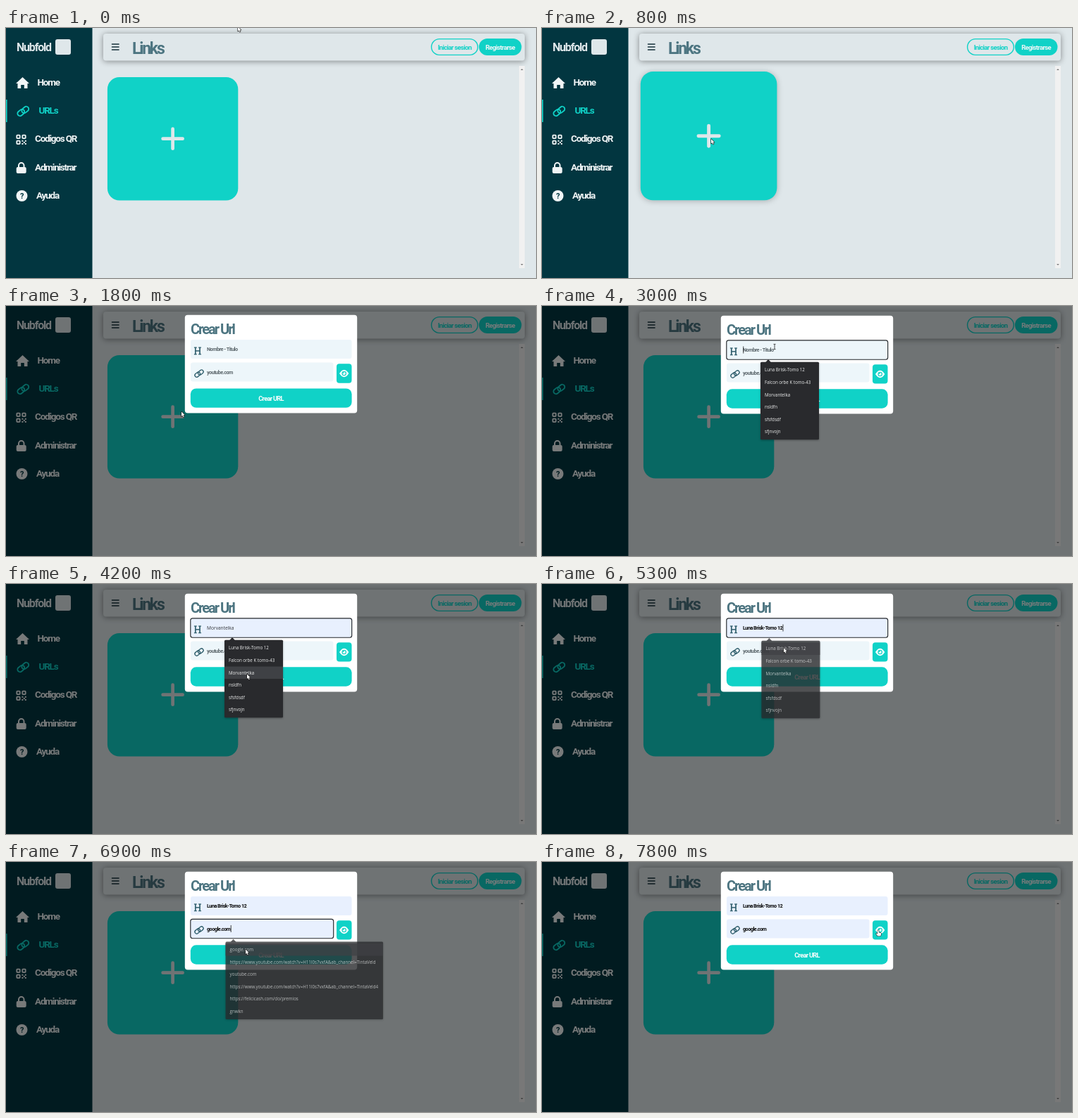
These frames come from a looping animation (752x356 px, 8000 ms). An HTML page with a canvas:

```html
<!DOCTYPE html>
<html lang="es">
<head>
<meta charset="utf-8">
<title>Links</title>
<style>
html, body { margin: 0; width: 100%; height: 100%; overflow: hidden; background: #dfe7ea; }
canvas { display: block; }
</style>
</head>
<body>
<canvas id="stage" width="752" height="356"></canvas>
<script>
const ctx = document.getElementById('stage').getContext('2d');
const LOOP = 8000;
const TEAL = '#10d2c7', PALE = '#dfe7ea', NAVY = '#023640', SLATE = '#4d7581', DEEP = '#315f6d';
const UI = 'Roboto, "Liberation Sans", sans-serif';
const MENU = '"Open Sans", "Noto Sans", sans-serif';

// Times of the user's actions
const OPEN = 1320, FOCUS1 = 2500, LIST1 = 2600, PICK1 = 5250, FOCUS2 = 5700, PICK2 = 6845, BLUR = 7800;
const ROW = 17.6;

const titles = ['Luna Brisk-Tomo 12', 'Falcon orbe K tomo-43', 'Morvantelka', 'nsldfn', 'sfsfdsdf', 'sfjnvojn'];
const watch = 'https://www.youtube.com/watch?v=H11l0s7vxfA&ab_channel=TintaVeld';
const urls = ['google.com', watch, 'youtube.com', watch + '4', 'https://felicicash.com/do/premios', 'gnwkn'];

const path = [
  [0, 329, -2], [100, 329, -2], [450, 302, 70], [800, 240, 158], [1450, 240, 158],
  [1800, 249, 150.5], [2100, 330, 58], [3400, 330, 58], [4000, 341, 139], [4200, 342, 128.5],
  [4550, 343, 91], [5300, 343, 91], [5500, 338, 91], [6000, 338, 91], [6500, 340, 124.5],
  [6900, 340, 124.5], [7500, 477, 97], [LOOP, 477, 97]
];

const ramp = (t, a, b) => Math.min(1, Math.max(0, (t - a) / (b - a)));
const smooth = k => k * k * (3 - 2 * k);
const easeOut = k => 1 - (1 - k) ** 2;
const inside = (p, x0, y0, x1, y1) => p.x >= x0 && p.x <= x1 && p.y >= y0 && p.y <= y1;

function pointer(t) {
  const i = path.findIndex((p, n) => n && t <= p[0]);
  const [t0, x0, y0] = path[i - 1], [t1, x1, y1] = path[i];
  const k = smooth(ramp(t, t0, t1));
  return { x: x0 + (x1 - x0) * k, y: y0 + (y1 - y0) * k };
}

function box(x, y, w, h, r, fill, stroke, width = 1) {
  ctx.beginPath();
  ctx.roundRect(x, y, w, h, r);
  if (fill) { ctx.fillStyle = fill; ctx.fill(); }
  if (stroke) { ctx.strokeStyle = stroke; ctx.lineWidth = width; ctx.stroke(); }
}

function disc(x, y, r, fill) {
  ctx.beginPath();
  ctx.arc(x, y, r, 0, 7);
  ctx.fillStyle = fill;
  ctx.fill();
}

function poly(points, fill) {
  ctx.beginPath();
  points.forEach(([x, y]) => ctx.lineTo(x, y));
  ctx.closePath();
  ctx.fillStyle = fill;
  ctx.fill();
}

function line(x0, y0, x1, y1, width, color, cap = 'round') {
  ctx.beginPath();
  ctx.moveTo(x0, y0);
  ctx.lineTo(x1, y1);
  ctx.lineWidth = width;
  ctx.lineCap = cap;
  ctx.strokeStyle = color;
  ctx.stroke();
}

// Returns the width of the text
function label(str, x, y, size, color, { track = -0.075, align = 'left', font = UI, weight = 700 } = {}) {
  ctx.font = `${weight} ${size}px ${font}`;
  ctx.letterSpacing = `${(track * size).toFixed(2)}px`;
  ctx.textAlign = align;
  ctx.textBaseline = 'alphabetic';
  ctx.fillStyle = color;
  ctx.fillText(str, x, y);
  return ctx.measureText(str).width;
}

function withShadow(color, blur, dy, draw) {
  ctx.save();
  ctx.shadowColor = color;
  ctx.shadowBlur = blur;
  ctx.shadowOffsetY = dy;
  draw();
  ctx.restore();
}

function chain(x, y, s, color) {
  ctx.save();
  ctx.translate(x, y);
  ctx.rotate(-0.68);
  ctx.scale(s, s);
  box(-9, -3.8, 10.8, 7, 3.5, null, color, 1.8);
  box(-1.8, -3.2, 10.8, 7, 3.5, null, color, 1.8);
  ctx.restore();
}

function menuIcons(color) {
  poly([[14, 79], [23.5, 70], [33, 79], [30.5, 79], [30.5, 86], [25.8, 86], [25.8, 81], [21.2, 81], [21.2, 86], [16.5, 86], [16.5, 79]], color);
  chain(24.3, 118.5, 1, TEAL);
  for (const [x, y] of [[15.3, 152.7], [23.3, 152.7], [15.3, 160.7]]) {
    box(x, y, 4.4, 4.4, 0.8, null, color, 1.8);
  }
  for (const [x, y] of [[22.4, 159.8], [24.8, 162], [22.4, 164], [26.8, 159.8], [26.8, 164]]) box(x, y, 2, 2, 0, color);
  box(18, 192, 7.5, 11, 3.7, null, color, 2);
  box(14.7, 198, 14, 9, 2, color);
  disc(22.5, 239, 8, color);
  label('?', 22.7, 243, 11, NAVY, { align: 'center', track: 0 });
}

function sidebar() {
  ctx.fillStyle = NAVY;
  ctx.fillRect(0, 0, 122.5, 356);
  label('Nubfold', 15, 33, 16, PALE);
  box(70, 16, 22, 22, 3, PALE);
  ctx.fillStyle = TEAL;
  ctx.fillRect(0, 102, 1.6, 32);
  const white = '#f1f5f6';
  menuIcons(white);
  [['Home', 44.5], ['URLs', 46.5], ['Codigos QR', 41], ['Administrar', 41], ['Ayuda', 43]].forEach(([name, x], i) =>
    label(name, x, 81.7 + i * 40.3, 13.5, i === 1 ? TEAL : white, { track: -0.09 }));
}

function header() {
  withShadow('rgba(0,0,0,.42)', 8, 1, () => box(138, 8, 598, 38.5, 4, PALE));
  for (const y of [23, 27, 31]) line(150.5, y, 160, y, 1.6, '#16303a');
  label('Links', 179, 36.5, 23, SLATE, { track: -0.095 });
  box(603.6, 15.6, 65.8, 22.8, 11.4, null, TEAL, 1.4);
  label('Iniciar sesion', 636.5, 30.6, 9.6, TEAL, { align: 'center' });
  box(671, 15, 60.5, 24, 12, TEAL);
  label('Registrarse', 701, 30.6, 9.6, '#eef6f7', { align: 'center' });
}

function scrollbar() {
  ctx.fillStyle = '#f1f1f1';
  ctx.fillRect(728, 54, 8, 288);
  poly([[730.2, 60], [732, 58], [733.8, 60]], '#777');
  poly([[730.2, 336], [732, 338], [733.8, 336]], '#777');
}

function card(t) {
  const h = easeOut(ramp(t, 430, 780)) * (1 - smooth(ramp(t, 1410, 1720)));
  ctx.save();
  ctx.translate(236.6, 157.7 - 4 * h);
  ctx.scale(1 + 0.044 * h, 1 + 0.044 * h);
  withShadow(`rgba(0,0,0,${0.25 * h})`, 8, 1, () => box(-92.7, -87.8, 185.4, 175.6, 17, TEAL));
  line(-14, 0, 14, 0, 4.7, PALE);
  line(0, -14, 0, 14, 4.7, PALE);
  ctx.restore();
}

function eye() {
  ctx.beginPath();
  ctx.moveTo(473, 97);
  ctx.quadraticCurveTo(479.7, 86.6, 486.4, 97);
  ctx.quadraticCurveTo(479.7, 107.4, 473, 97);
  ctx.fillStyle = '#fff';
  ctx.fill();
  disc(479.7, 97, 3.3, TEAL);
  disc(479.7, 97, 2.1, '#fff');
  disc(478.8, 96, 0.9, TEAL);
}

function field(f, t) {
  const filled = t >= f.pick, preview = !filled && f.hover >= 0;
  const focused = t >= f.focus && t < f.blur;
  box(262, f.y, f.w, 27, 3, filled || preview ? '#e8f0fe' : '#edf6fa');
  if (focused) box(261.8, f.y - 0.2, f.w + 0.4, 27.4, 3, null, '#23272b', 1.15);
  const base = f.y + 16.2;
  let width = 0;
  if (filled) width = label(f.list[0], 285, base, 7.3, '#0a0a0a');
  else if (preview) {
    ctx.save();
    ctx.beginPath();
    ctx.rect(285, f.y, f.w - 30, 27);
    ctx.clip();
    label(f.list[f.hover], 285, base, 6.6, '#33363a', { font: MENU, weight: 400, track: 0 });
    ctx.restore();
  } else label(f.hint, 285, base, 7.3, '#5b666b');
  const since = t - (filled ? f.pick : f.open);
  if (focused && since >= 0 && Math.floor(since / 500) % 2 === 0) {
    ctx.fillStyle = '#111';
    ctx.fillRect(285.4 + width, f.y + 8.5, 0.8, 10);
  }
}

function popup(f, t) {
  const alpha = t < f.open ? 0 : 1 - ramp(t, f.pick, f.pick + 200);
  if (!alpha) return;
  ctx.save();
  ctx.globalAlpha = alpha;
  ctx.translate((1 - alpha) * 5.5, (1 - alpha) * 4);
  const dark = '#292a2d';
  withShadow('rgba(0,0,0,.3)', 3, 1, () => box(310, f.top - 2.5, f.menuW, 110.5, 1.5, dark));
  poly([[317, f.top - 2], [321, f.top - 6.2], [325, f.top - 2]], dark);
  if (f.hover >= 0) box(310, f.top + f.hover * ROW, f.menuW, ROW, 0, '#3f4145');
  f.list.forEach((s, i) =>
    label(s, 316, f.top + ROW * (i + 0.5) + 2.2, 6.2, '#eceded', { font: MENU, weight: 400, track: 0 }));
  ctx.restore();
}

function modal(t, fields) {
  const fade = ramp(t, 1480, 1700);
  if (!fade) return;
  ctx.save();
  ctx.globalAlpha = fade;
  ctx.translate(0, -50 * (1 - easeOut(ramp(t, 1480, 1850))));
  box(253.8, 13.7, 244.4, 139.7, 4, '#fff');
  label('Crear Url', 262, 40.8, 20, SLATE, { track: -0.1 });
  fields.forEach(f => field(f, t));
  for (const x of [268.8, 275]) {
    line(x, 60, x, 70, 1.7, DEEP, 'butt');
    for (const y of [60, 69.6]) line(x - 1.9, y, x + 1.9, y, 1.3, DEEP, 'butt');
  }
  line(268.8, 64.8, 275, 64.8, 1.5, DEEP, 'butt');
  chain(274, 97, 0.76, DEEP);
  box(469, 83.2, 21.5, 27.4, 4, TEAL);
  eye();
  box(261.8, 118.3, 228.8, 27.4, 8, TEAL);
  label('Crear URL', 376, 136.2, 9.2, '#fff', { align: 'center' });
  ctx.restore();
}

const arrow = new Path2D('M0 0V6.6L1.5 5.2 2.6 7.7 3.7 7.2 2.6 4.8H4.7Z');
const hand = new Path2D('M-.8 .6Q0-.4 .8 .6V3.2L3.6 3.9Q4.4 4.2 4.2 5.2L3.5 8.4H-.8L-3 5.2Q-2.8 4.3-1.8 4.8L-.8 5.6Z');

function cursor(p, kind) {
  ctx.save();
  ctx.translate(p.x, p.y);
  if (kind === 'beam') {
    line(0, -3.4, 0, 3.4, 0.8, '#222', 'butt');
    for (const y of [-3.6, 3.6]) line(-1.5, y, 1.5, y, 0.8, '#222', 'butt');
  } else {
    const shape = kind === 'hand' ? hand : arrow;
    ctx.lineJoin = 'round';
    ctx.lineWidth = 1.1;
    ctx.strokeStyle = '#111';
    ctx.stroke(shape);
    ctx.fillStyle = '#fff';
    ctx.fill(shape);
  }
  ctx.restore();
}

function cursorKind(p, t, fields) {
  if (t < 1800) return 'arrow';
  if (fields.some(f => f.over)) return 'arrow';
  if (inside(p, 469, 83, 490, 111) || inside(p, 262, 118, 490, 146)) return 'hand';
  if (fields.some(f => inside(p, 262, f.y, 262 + f.w, f.y + 27))) return 'beam';
  return 'arrow';
}

const inputs = [
  { y: 49, w: 228.5, top: 82.3, menuW: 83, list: titles, hint: 'Nombre - Titulo', focus: FOCUS1, open: LIST1, pick: PICK1, blur: FOCUS2 },
  { y: 81.5, w: 202.5, top: 114.9, menuW: 223.5, list: urls, hint: 'youtube.com', focus: FOCUS2, open: FOCUS2, pick: PICK2, blur: BLUR }
];

function render(t) {
  const p = pointer(t);
  const fields = inputs.map(f => {
    const over = t >= f.open && t < f.pick + 200 && inside(p, 310, f.top, 310 + f.menuW, f.top + 6 * ROW - 0.1);
    return { ...f, over, hover: over ? Math.floor((p.y - f.top) / ROW) : -1 };
  });
  ctx.fillStyle = PALE;
  ctx.fillRect(0, 0, 752, 356);
  sidebar();
  header();
  scrollbar();
  card(t);
  ctx.fillStyle = `rgba(0,0,0,${0.5 * ramp(t, OPEN, OPEN + 150)})`;
  ctx.fillRect(0, 0, 752, 356);
  modal(t, fields);
  fields.forEach(f => popup(f, t));
  cursor(p, cursorKind(p, t, fields));
}

const start = performance.now();
function tick() {
  render((performance.now() - start) % LOOP);
  requestAnimationFrame(tick);
}
tick();
</script>
</body>
</html>
```
